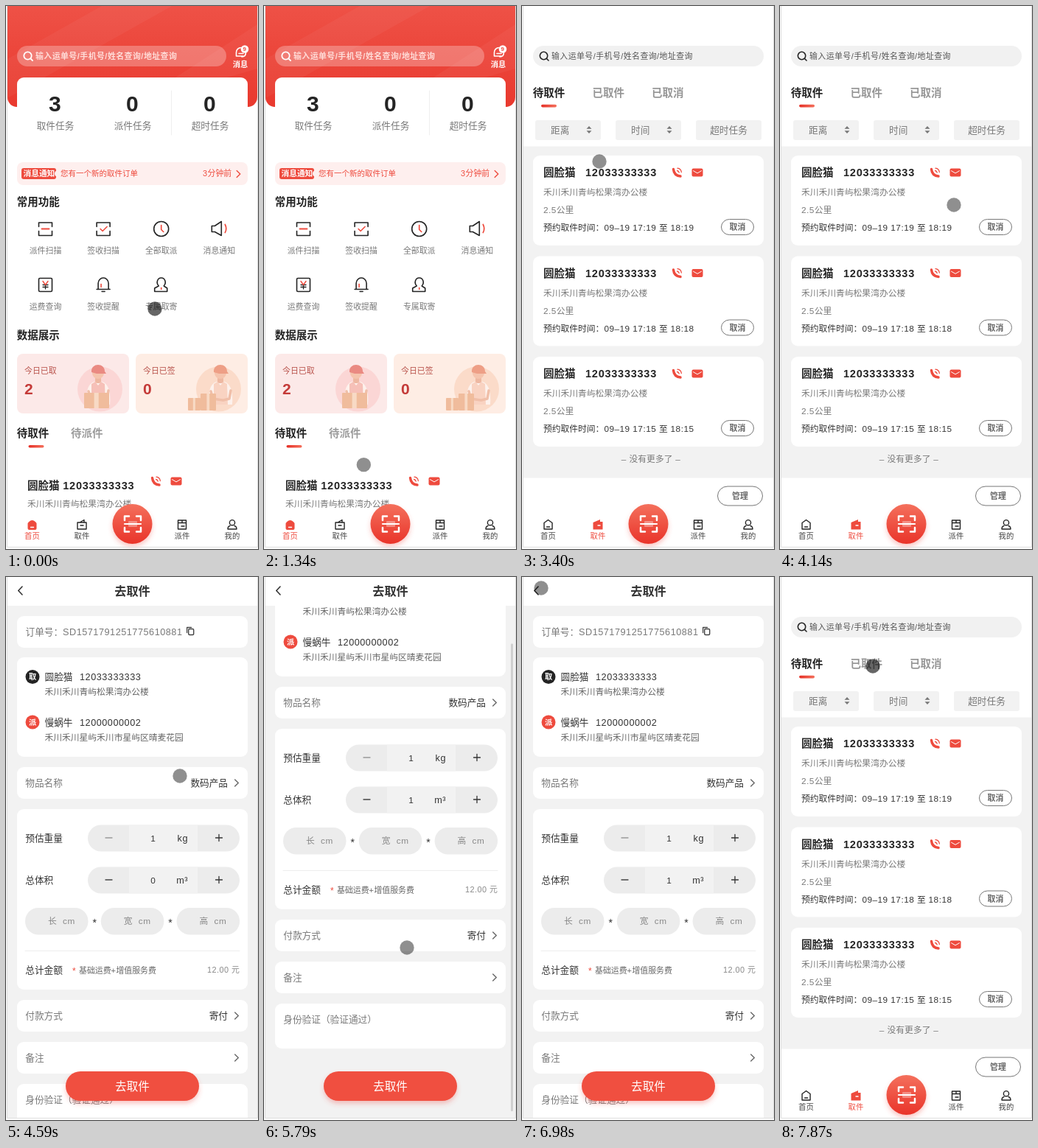
An HTML page that plays this animation: 342 by 737 pixels, repeating every 8000 ms.

```html
<!DOCTYPE html>
<html lang="zh-CN">
<head>
<meta charset="utf-8">
<title>取件</title>
<style>
html, body { margin: 0; width: 100%; height: 100%; overflow: hidden; background: #fff; }
svg { display: block; width: 342px; height: 737px; }
text { font-family: "Liberation Sans", "Noto Sans CJK SC", "Noto Sans CJK", sans-serif; white-space: pre; }
.n { letter-spacing: .042em; }
[font-weight="700"] .n { letter-spacing: .052em; }
path { fill: none; stroke-linecap: round; stroke-linejoin: round; }
</style>
</head>
<body>
<svg id="stage" viewBox="0 0 342 737"></svg>
<script>
const RED = '#ee4b3e', INK = '#242424', GRAY = '#787878', PALE = '#f2f2f2';
const NAME = '圆脸猫', PHONE = '12033333333', PLACE = '禾川禾川青屿松果湾办公楼';
const NAME2 = '慢蜗牛', PHONE2 = '12000000002', PLACE2 = '禾川禾川星屿禾川市星屿区晴麦花园';
const HINT = '输入运单号/手机号/姓名查询/地址查询';

// Drawing helpers; text is placed by its vertical centre.
const text = (x, cy, size, str, fill = GRAY, weight = 400, anchor = 'start', more = '') =>
  `<text x="${x}" y="${cy + size * .37}" font-size="${size}" fill="${fill}" font-weight="${weight}" text-anchor="${anchor}" ${more}>` +
  str.replace(/[ -~–³]+/g, '<tspan class="n">$&</tspan>') + '</text>';
const mid = (x, cy, size, str, fill, weight) => text(x, cy, size, str, fill, weight, 'middle');
const rect = (x, y, w, h, r, fill, more = '') =>
  `<rect x="${x}" y="${y}" width="${w}" height="${h}" rx="${r}" fill="${fill}" ${more}/>`;
const circle = (x, y, r, fill, more = '') => `<circle cx="${x}" cy="${y}" r="${r}" fill="${fill}" ${more}/>`;
const line = (d, color = INK, width = 1.6) => `<path d="${d}" stroke="${color}" stroke-width="${width}"/>`;
const shape = (d, fill) => `<path d="${d}" style="fill:${fill}"/>`;
const at = (x, y, body) => `<g transform="translate(${x} ${y})">${body}</g>`;
const chevron = (x, y, color = '#666') => at(x, y, line('M-2.3 -4.5L2.3 0L-2.3 4.5', color, 1.4));
const card = (y, h) => rect(15, y, 313, h, 9, '#fff');
const pill = (x, y, w, h, label) =>
  rect(x + .5, y + .5, w - 1, h - 1, h / 2, '#fff', 'stroke="#777"') + mid(x + w / 2, y + h / 2, 10.9, label, '#666', 700);
const magnifier = (color, width) =>
  circle(29.5, 67.5, 5.2, 'none', `stroke="${color}" stroke-width="${width}"`) + line('M33.5 71.5L36 74', color, width);
const hint = (color, weight) => text(40, 67.5, 10.9, HINT, color, weight, 'start', 'letter-spacing=".45"');

const contact = (x, y) =>
  at(x, y, line('M-5 -4.5C-4.5 1 -1 4.5 4.5 5', RED, 3.4) + line('M0 -2.5a3.5 3.5 0 0 1 2.7 2.7M.5 -5.8a6 6 0 0 1 5.3 5.3', RED, 1.3)) +
  rect(x + 20, y - 5.5, 15, 11, 2, RED) + line(`M${x + 22} ${y - 2.3}l5.5 3.2l5.5 -3.2`, '#fff', 1);

const frameIcon = 'M-9 -3V-8.5H9V-3M-9 3V9H9V3';
const tools = [
  ['派件扫描', line(frameIcon) + line('M-5 0H5', RED, 1.8)],
  ['签收扫描', line(frameIcon) + line('M-4 0L-1 3L5 -3', RED)],
  ['全部取派', circle(0, 0, 10, 'none', `stroke="${INK}" stroke-width="1.6"`) + line('M0 -5V1L3 4', RED, 1.7)],
  ['消息通知', line('M-10 -4H-6L3 -10V9L-6 4H-10Z') + line('M8 -6Q11 0 8 5', RED, 1.7)],
  ['运费查询', rect(-9, -9, 18, 18, 1.5, 'none', `stroke="${INK}" stroke-width="1.6"`) + line('M0 0V5.5M-3.5 0H3.5M-3.5 3H3.5', INK, 1.3) + line('M-3.5 -5L0 0L3.5 -5', RED, 1.4)],
  ['签收提醒', line('M-9 6H9M-7 6V-2A7 7.5 0 0 1 7 -2V6M-2 9H2') + line('M-3 -1V3', RED)],
  ['专属取寄', line('M-3.5 1.5C-7.5 -3 -5 -9.5 0 -9.5S7.5 -3 3.5 1.5L8 4.5V9H-9V4.5Z') + line('M0 4V6', RED)]
];

const navIcons = [
  c => line('M-5.5 -2.5L0 -6.5L5.5 -2.5V6H-5.5ZM-2 3H2', c, 1.4),
  c => line('M-6 -3H6V6H-6ZM-3 -3L3 -6.5V-3M-2 1H2', c, 1.4),
  c => line('M-5.5 -6H5.5V6H-5.5ZM-5.5 -2.5H5.5M0 -6V-2.5M-1 2H3', c, 1.4),
  c => circle(0, -2.8, 3.6, 'none', `stroke="${c}" stroke-width="1.4"`) + line('M-3 1.5C-5 2 -6 4 -6 6H6C6 4 5 2 3 1.5', c, 1.4)
];
const activeIcons = [
  shape('M-6 -2Q0 -10 6 -2V5Q6 7 4 7H-4Q-6 7 -6 5Z', RED) + line('M-2 3.5H2', '#fff', 1.4),
  shape('M-6.5 -3L3 -7V-4H6.5V6.5H-6.5Z', RED) + line('M0 1H3', '#fff', 1.4)
];
const nav = active => rect(2, 683, 339, 51, 0, '#fff') +
  ['首页', '取件', '派件', '我的'].map((label, i) => {
    const x = [35.5, 103, 239, 307][i], on = i === active;
    return at(x, 704, on ? activeIcons[i] : navIcons[i](INK)) + mid(x, 719, 10.4, label, on ? RED : '#444');
  }).join('') +
  circle(171.5, 703, 27, 'url(#ball)', 'filter="url(#soft)"') +
  at(172, 703, line('M-11 -5V-10.5H-5M5 -10.5H11V-5M-11 5V10.5H-5M5 10.5H11V5', '#fff', 2.5) +
    rect(-6, -4, 12, 8, 1, '#fff', 'opacity=".35"') + line('M-11 0H11', '#fff', 2.2));

const courier = (x, y, cap, vest) => at(x, y,
  shape('M-15 33Q-18 7 -6 2L6 2Q18 7 16 33Z', '#fdf1ec') +
  shape('M-9 5L-9 33H10L9 5L4 2L0 7L-4 2Z', vest) +
  rect(-4, -5, 8, 9, 3, '#eeb8a2') + circle(0, -10, 8, '#f5c4ad') +
  shape('M-9 -11C-10 -24 9 -24 9 -12L11 -9H-2Z', cap) +
  line('M-13 15L-10 25L3 27M14 14L12 25L4 27', '#f0bfa9', 3.5));
const parcel = (x, y, w, h) => rect(x, y, w, h, 1, '#f0bc9c') + rect(x + w * .4, y, w * .18, h, 0, '#f8dac5');

const stat = (x, fill, dot, label, count) => rect(x, 472, 152, 81, 8, fill) +
  circle(x + 112.5, 520, 30.5, dot) + text(x + 10, 495, 10.9, label, '#b9544d') +
  text(x + 10, 519, 21, count, '#c43a38', 700);

const home = () => `<g id="home">
  ${rect(2, -20, 339, 157, 13, 'url(#head)')}
  <g fill="#fff" opacity=".04"><polygon points="2,72 130,0 225,0 2,125"/><polygon points="230,97 341,25 341,85 300,97"/></g>
  ${rect(15, 54, 284, 28, 14, '#fff', 'opacity=".27"')}${magnifier('#fff', 1.8)}${hint('#ffdcd8', 700)}
  ${line('M322 68H312.5V63A6.5 6.5 0 0 1 319 56.5M325.5 63Q325.5 69 320 69M316 64.5H322', '#fff', 1.6)}
  ${circle(324, 58.5, 5.3, '#fff')}${mid(324, 58.5, 8, '9', RED, 700)}
  ${mid(318, 79, 10.3, '消息', '#fff', 700)}
  ${rect(15, 97, 313, 104, 9, '#fff')}
  ${['取件任务', '派件任务', '超时任务'].map((label, i) =>
    mid(67 + i * 105, 132, 30, i ? '0' : '3', INK, 700) + mid(67 + i * 105, 162, 12.67, label)).join('')}
  ${line('M224.5 115V175', '#efefef', 1)}
  ${rect(15, 212, 313, 31, 8, '#feefee')}${rect(21, 220, 47, 15, 3, RED)}${circle(70, 227.5, 4, '#feefee')}
  ${text(23.5, 227.5, 10.7, '消息通知', '#fff', 700)}
  ${text(74, 227, 10.5, '您有一个新的取件订单', RED)}${text(267, 227, 10.9, '3分钟前', RED)}${chevron(315.5, 228, RED)}
  ${text(14.8, 266, 14.5, '常用功能', INK, 700)}
  ${tools.map(([label, icon], i) => {
    const x = 53.5 + (i % 4) * 78.6, y = 302.5 + (i > 3) * 76;
    return at(x, y, icon) + mid(x, y + 29.5, 10.9, label);
  }).join('')}
  ${text(14.8, 447, 14.5, '数据展示', INK, 700)}
  ${stat(15, '#fce9e8', '#fbd6d5', '今日已取', '2')}${courier(125, 508, '#ea8a82', '#f6c0b8')}${parcel(106, 525, 34, 21)}
  ${stat(176, '#feede4', '#fbdbc9', '今日已签', '0')}${courier(291, 508, '#ee9f86', '#f9d3c2')}${parcel(247, 532, 17, 17)}${parcel(264, 526, 21, 23)}
  ${text(14.8, 580, 14.5, '待取件', INK, 700)}${text(88, 580, 14.5, '待派件', '#9c9c9c', 700)}
  ${rect(30.5, 596, 21, 3.6, 1.8, 'url(#bar)')}
  ${text(29, 651, 14.5, `${NAME} ${PHONE}`, INK, 700)}${contact(203.5, 645)}
  ${text(29, 676, 11.77, PLACE)}
  ${nav(0)}</g>`;

const order = (y, minute) => card(y, 122) +
  text(29, y + 23, 14.5, NAME, INK, 700) + text(86, y + 23, 14.5, PHONE, INK, 700) + contact(210.5, y + 23) +
  text(29, y + 50, 11.77, PLACE) + text(29, y + 74, 11.77, '2.5公里') +
  text(29, y + 98, 11.77, `预约取件时间：09–19 17:${minute} 至 18:${minute}`, '#333') +
  pill(270, y + 86, 45, 22, '取消');

const sorter = x => shape(`M${x - 3.5} 166.7L${x} 163L${x + 3.5} 166.7ZM${x - 3.5} 169.3L${x} 173L${x + 3.5} 169.3Z`, '#777');
const list = () => `<g id="list">
  ${rect(15, 54, 313, 28, 14, '#f1f1f1')}${magnifier(INK, 1.6)}${hint('#555', 400)}
  ${['待取件', '已取件', '已取消'].map((s, i) => text(14.8 + i * 80.6, 118, 14.5, s, i ? '#969696' : INK, 700)).join('')}
  ${rect(26, 133.8, 21, 3.6, 1.8, 'url(#bar)')}
  ${[18, 127, 236].map(x => rect(x, 155, 89, 27, 3, PALE)).join('')}
  ${text(39, 168, 12.67, '距离')}${sorter(91)}${text(148, 168, 12.67, '时间')}${sorter(200)}${mid(280.5, 168, 12.67, '超时任务')}
  ${rect(2, 190.5, 339, 450, 0, PALE)}
  <g id="orders">${['19', '18', '15'].map((m, i) => order(203 + i * 136.5, m)).join('')}
  ${mid(175, 615, 11.77, '– 没有更多了 –')}</g>
  ${pill(265, 651.5, 62, 27, '管理')}
  ${nav(1)}</g>`;

const person = (y, mark, color, name, phone, place) => circle(36, y, 9.5, color) + mid(36, y, 10.2, mark, '#fff', 700) +
  `<g class="data">${text(52.5, y, 12.67, name, '#333')}${text(100, y, 12.67, phone, '#333')}${text(52.5, y + 20.5, 11.77, place, '#666')}</g>`;
const stepper = (y, label, unit, id, value, minus) => text(26.3, y, 12.67, label, '#333') +
  rect(111, y - 17.5, 206, 36, 18, '#ececec') + rect(167, y - 17.5, 93, 36, 0, PALE) +
  line(`M135 ${y}H144`, minus, 1.3) + line(`M284.5 ${y}H293.5M289 ${y - 4.5}V${y + 4.5}`, '#333', 1.3) +
  `<text id="${id}" x="199.5" y="${y + 4.7}" font-size="11.8" fill="#333" text-anchor="middle">${value}</text>` +
  text(247, y, 12.67, unit, '#333', 400, 'end');
const row = (y, label, value = '') => card(y, 43) + text(26.3, y + 21.5, 12.67, label) +
  text(301, y + 21.5, 12.67, value, '#333', 400, 'end') + chevron(313, y + 21.5);

const detail = () => `<g id="detail">
  ${rect(2, 0, 339, 734, 0, PALE)}
  <g id="scroll">
  ${card(53, 43)}${text(26.5, 74, 12.67, '订单号：')}
  <g class="data">${text(77, 74, 12.67, 'SD1571791251775610881')}</g>
  ${rect(247.7, 70.5, 7, 8, 1.5, '#fff', 'stroke="#444" stroke-width="1.4"')}${line('M245.6 75.5V68.5H251.5', '#444', 1.3)}
  ${card(109, 135)}
  ${person(135.5, '取', INK, NAME, PHONE, PLACE)}${person(197, '派', RED, NAME2, PHONE2, PLACE2)}
  ${row(258, '物品名称', '数码产品')}
  ${card(315, 245)}
  ${stepper(354, '预估重量', 'kg', 'weight', 1, '#999')}${stepper(411, '总体积', 'm³', 'volume', 0, '#444')}
  ${['长', '宽', '高'].map((s, i) => {
    const x = 26 + i * 102.8;
    return rect(x, 449, 85.5, 36.5, 18, '#ececec') + text(x + 31, 467, 11.77, s, '#888') + text(x + 51, 467, 11.77, 'cm', '#888') +
      (i < 2 ? mid(x + 94.5, 469, 14, '*', '#333') : '');
  }).join('')}
  ${line('M26 507.5H317', '#ededed', 1)}
  ${text(26.3, 533.5, 12.67, '总计金额', '#333')}${text(90, 535, 12, '*', RED)}
  ${text(99, 534, 10.9, '基础运费+增值服务费', '#666')}${text(317, 533, 10.9, '12.00 元', '#888', 400, 'end')}
  ${row(574, '付款方式', '寄付')}${row(631, '备注')}
  ${card(688, 61)}${text(26.3, 709.5, 12.67, '身份验证（验证通过）')}
  </g>
  ${rect(0, 735, 342, 2, 0, '#fff')}${rect(2, 0, 339, 39, 0, '#fff')}
  ${line('M22 13L16.8 18.5L22 24', '#333', 1.6)}${mid(171.5, 19, 16.2, '去取件', '#333', 700)}
  ${rect(81, 671, 181, 40, 20, '#f04f40', 'filter="url(#soft)"')}${mid(171.5, 691, 15.6, '去取件', '#fff', 500)}
  ${rect(335, 3, 3, 635, 1.5, '#d0d0d0', 'id="thumb"')}</g>`;

const gradient = (id, dir, from, to) =>
  `<linearGradient id="${id}" ${dir}><stop stop-color="${from}"/><stop offset="1" stop-color="${to}"/></linearGradient>`;
const stage = document.getElementById('stage');
stage.innerHTML = `<defs>
  ${gradient('head', 'x2="0" y2="1"', '#ef554a', '#e9392e')}${gradient('ball', 'x2="0" y2="1"', '#f4705c', '#e9342a')}
  ${gradient('bar', '', '#e52f26', '#f4705c')}
  <filter id="soft" x="-20%" y="-20%" width="140%" height="170%"><feDropShadow dx="0" dy="4" stdDeviation="3" flood-color="#ee4b3e" flood-opacity=".3"/></filter>
  </defs>${home()}${list()}${detail()}
  ${line('M1.5 0V734.5H341.5V0', '#dedede', 1)}${circle(0, 0, 9.7, '#000', 'id="touch"')}`;

// Keys are [tick, values...]; positions between keys are linear.
const touchPath = [
  [0, 202, 411], [1, 247, 644], [2, 247, 644], [4, 205, 530], [6, 145, 449], [7, 134, 510], [10, 136, 679], [11, 136, 679],
  [13, 107, 708], [14, 100, 650], [17, 59, 180], [19, 67, 134], [20, 67, 134], [23, 105, 211], [26, 222, 257], [27, 233, 262],
  [28, 236, 270], [31, 236, 270], [32, 288, 409], [34, 288, 409], [36, 235, 465], [38, 194, 503], [40, 194, 503],
  [43, 64, 66], [46, 27, 18], [47, 26, 15], [48, 45, 41], [51, 126, 121], [53, 126, 121]
];
const scrollPath = [[0, 0], [35, 0], [36, 35], [37, 85], [38, 109], [40, 109], [41, 70], [42, 15], [43, -3], [44, 0], [53, 0]];
const pressed = [0, 19, 34, 46, 53];

function sample(keys, tick) {
  const i = Math.max(1, keys.findIndex(k => k[0] >= tick));
  const [a, b] = [keys[i - 1], keys[i]];
  const p = (tick - a[0]) / (b[0] - a[0]);
  return a.slice(1).map((v, j) => v + (b[j + 1] - v) * p);
}

const $ = id => document.getElementById(id);
const show = (el, on) => { el.style.display = on ? '' : 'none'; };
const dataParts = [...document.querySelectorAll('.data')];

function render(tick) {
  const page = tick < 20 ? 'home' : tick < 30 || tick > 47 ? 'list' : 'detail';
  ['home', 'list', 'detail'].forEach(id => show($(id), id === page));
  show($('orders'), tick !== 20 && tick !== 48);
  dataParts.forEach(el => show(el, tick !== 30));
  const [x, y] = sample(touchPath, tick), [offset] = sample(scrollPath, tick);
  $('touch').setAttribute('transform', `translate(${x} ${y})`);
  $('touch').setAttribute('opacity', pressed.includes(tick) ? .6 : .44);
  $('scroll').setAttribute('transform', `translate(0 ${-offset})`);
  $('volume').textContent = tick < 34 ? 0 : 1;
  $('thumb').setAttribute('y', 3 + Math.max(0, offset) * .8);
  show($('thumb'), tick > 35 && tick < 47);
}

// The picture advances in even ticks, 54 to a loop; LEAD absorbs rounding at their edges.
const LOOP = 8000, TICKS = 54, LEAD = 15;
let last = -1;
function loop() {
  const time = performance.now() % LOOP;
  const tick = Math.min(TICKS - 1, Math.floor((time + LEAD) * TICKS / LOOP));
  if (tick !== last) render(last = tick);
  requestAnimationFrame(loop);
}
loop();
</script>
</body>
</html>
```
